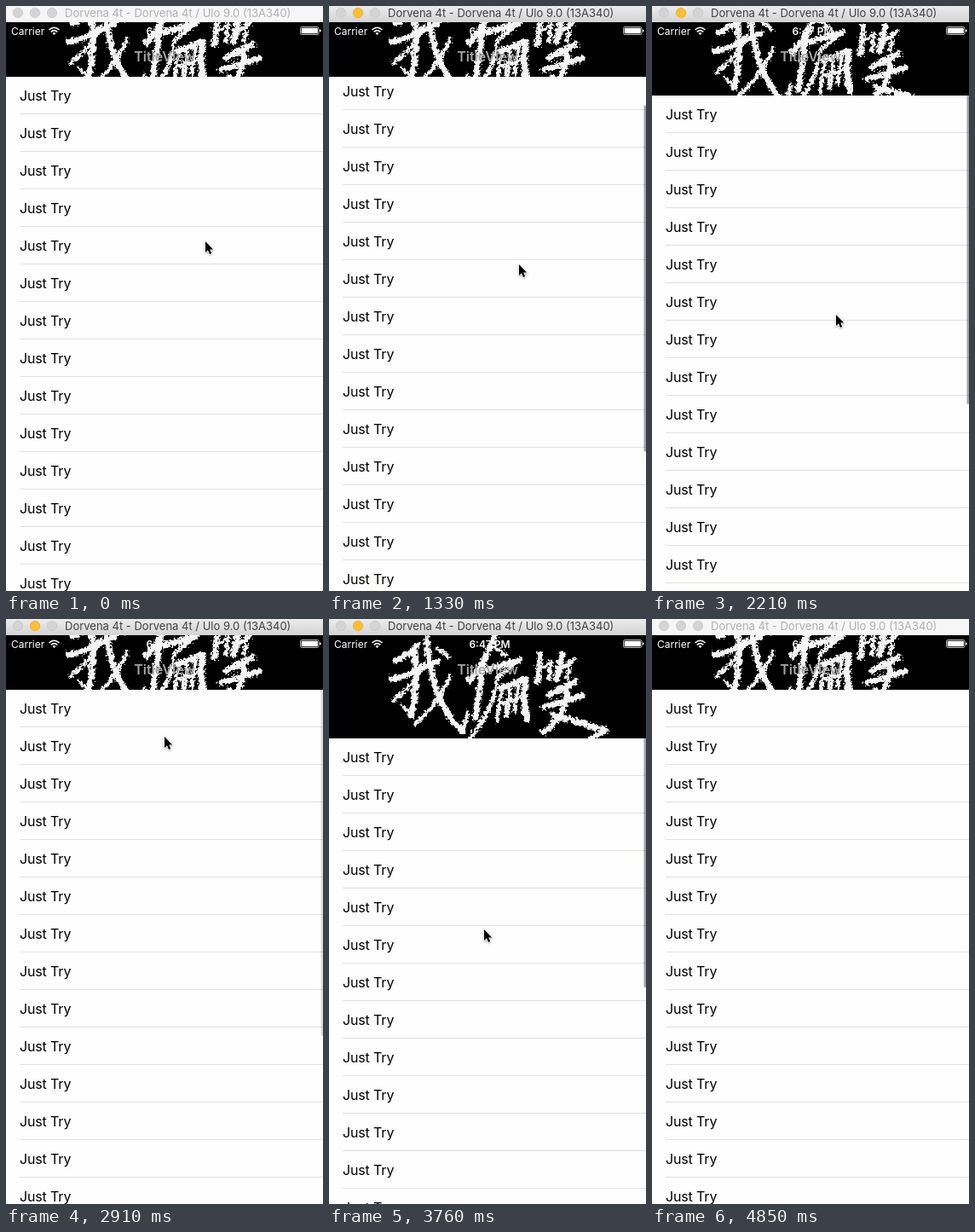
Animation of 372 by 686 pixels, one loop 4.88 s. Source, as an HTML page:

```html
<!DOCTYPE html>
<html>
<head>
<meta charset="utf-8">
<style>
  html, body { margin: 0; width: 100%; height: 100%; overflow: hidden; background: #fefefe; }
  svg { display: block; }
  text { font-family: Inter, "Open Sans", sans-serif; }
  #rows text { font-size: 16px; letter-spacing: -.15px; }
  #rows rect { fill: #e1e1e3; }
  #status { fill: #fff; font-size: 12px; }
  #ink { fill: none; stroke: #f4f4f4; stroke-linecap: round; stroke-linejoin: round; }
  .broad { stroke-width: 7; }
  .fine { stroke-width: 4.5; }
  circle { fill: #d4d4d4; stroke: #c2c2c2; stroke-width: .6; }
  #bar { fill: #f6f6f6; }
  #name { fill: #b0b0b0; font-size: 13px; }
  .active #bar { fill: url(#chrome); }
  .active #name { fill: #404040; }
  .active #amber { fill: #fdbe2f; stroke: #e0a126; }
</style>
</head>
<body>
<svg id="stage" width="372" height="686">
  <defs>
    <linearGradient id="chrome" x2="0" y2="1">
      <stop stop-color="#ececec"/><stop offset="1" stop-color="#d3d3d3"/>
    </linearGradient>
    <filter id="bristle" color-interpolation-filters="sRGB">
      <feTurbulence baseFrequency=".2" numOctaves="2" seed="4"/>
      <feDisplacementMap in="SourceGraphic" scale="7" xChannelSelector="R" yChannelSelector="G"/>
    </filter>
  </defs>
  <rect width="372" height="686" fill="#fefefe"/>
  <g id="rows"></g>
  <rect id="thumb" x="369.5" width="2.5" rx="1.2"/>
  <svg id="cover" y="19" width="372">
    <rect width="372" height="686"/>
    <g id="ink">
      <g filter="url(#bristle)">
        <path class="broad" d="M102 16Q92 29 76 34M72 56Q95 51 126 35M98 24Q104 56 95 99M113 9Q118 86 155 117"/>
        <path class="fine" d="M95 99L84 87M108 39Q97 65 73 82M155 117L161 96M140 53Q126 86 99 109M126 20L139 31"/>
        <path class="broad" d="M193 4Q185 32 163 58M179 38Q174 71 170 102M184 45L221 34M200 67L229 56Q225 87 231 103"/>
        <path class="fine" d="M221 34L196 55Q192 91 163 127M202 63L195 106M211 65L207 99M220 63L216 94M198 85L228 77M192 19L206 28"/>
        <path class="broad" d="M246 28L243 59M272 27L265 57M288 59L256 75M250 89L295 76M278 66Q279 99 250 118M260 98L323 116"/>
        <path class="fine" d="M244 47L258 36M259 36L257 56M267 46L286 33M280 40L278 56M323 117L304 125"/>
      </g>
    </g>
  </svg>
  <text x="186" y="65" text-anchor="middle" font-size="16" font-weight="600" fill="#a4a4a4">TitleView</text>
  <g id="status">
    <text x="6" y="33.5">Carrier</text>
    <text x="188.5" y="33.5" text-anchor="middle" font-weight="600">6:47 PM</text>
    <path d="M50.5 28Q56.5 22.5 62.5 28M52.7 30.3Q56.5 26.8 60.3 30.3" fill="none" stroke="#fff" stroke-width="1.6"/>
    <path d="M54.5 32Q56.5 30.2 58.5 32L56.5 34Z"/>
    <rect x="345.5" y="24.5" width="21.5" height="9" rx="1.8" fill="none" stroke="#fff" stroke-width=".7"/>
    <rect x="346.7" y="25.7" width="19.1" height="6.6" rx=".8"/>
    <rect x="368" y="27.5" width="1.5" height="3" rx=".7"/>
  </g>
  <rect id="bar" width="372" height="19"/>
  <circle cx="14" cy="8" r="5.7"/>
  <circle cx="34" cy="8" r="5.7" id="amber"/>
  <circle cx="54" cy="8" r="5.7"/>
  <text id="name" x="69" y="13">Dorvena 4t - Dorvena 4t / Ulo 9.0 (13A340)</text>
  <path id="cursor" d="M0 0V13L3 10.2L5 15L7.2 14L5.2 9.4H9.2Z"
    stroke="#fff" stroke-width="1.4" paint-order="stroke" style="filter:drop-shadow(0 1px 1px #0005)"/>
</svg>
<script>
const LOOP = 4880, ROW = 44, TOP = 83, VIEW = 603;
const REST = 59;                                // where the first scroll settles
const GRAB = 1880, DROP = 2380, REGRAB = 2980, REDROP = 3649;

const $ = id => document.getElementById(id);
const set = (el, attrs) => { for (const k in attrs) el.setAttribute(k, attrs[k]); };
const ramp = (t, a, b) => Math.min(1, Math.max(0, (t - a) / (b - a)));

const linear = u => u;
const smooth = u => u * u * (3 - 2 * u);
const easeOut = u => 1 - (1 - u) ** 2;
const sineOut = u => Math.sin(u * Math.PI / 2);

$('rows').innerHTML = Array.from({ length: 20 }, (_, i) =>
  `<text x="16" y="${TOP + i * ROW + 27.5}">Just Try</text>` +
  `<rect x="16" y="${TOP + i * ROW + 43}" width="356" height="1"/>`).join('');

// Each leg moves the pointer on to x, y
const legs = [
  { from: 60, to: 500, x: 217, y: 374, ease: linear },
  { from: 760, to: 1730, x: 227, y: 253, ease: linear },
  { from: GRAB, to: DROP, x: 211, y: 417, ease: linear },
  { from: 2440, to: 2910, x: 186, y: 138, ease: smooth },
  { from: REGRAB, to: 3500, x: 182, y: 364, ease: sineOut },
  { from: 4190, to: 4670, x: 400, y: 560, ease: smooth }
];
function pointer(t) {
  let x = 234, y = 276;
  for (const leg of legs) {
    const u = leg.ease(ramp(t, leg.from, leg.to));
    x += (leg.x - x) * u;
    y += (leg.y - y) * u;
  }
  return { x, y };
}

// Dragging past the top meets growing resistance
const rubber = off => off >= 0 ? off : -VIEW * (1 - 1 / (1 - off * .55 / VIEW));
const drag = (t, anchor, max) => rubber(Math.min(max, anchor - pointer(t).y));
// Critically damped return to rest
const spring = ms => (1 + ms / 80) * Math.exp(-ms / 80);

function offset(t) {
  if (t < GRAB) return REST * easeOut(ramp(t, 760, 1730));
  if (t < DROP) return drag(t, 320, REST);
  if (t < REGRAB) return drag(DROP, 320, REST) * spring(t - DROP);
  if (t < REDROP) return drag(t, 154, 0);
  return drag(REDROP, 154, 0) * spring(t - REDROP);
}

function draw(t) {
  const off = Math.round(offset(t)), { x, y } = pointer(t);
  const pull = Math.max(0, -off), h = TOP - 19 + pull;
  set($('rows'), { transform: `translate(0 ${-off})` });
  set($('cover'), { height: h });
  set($('ink'), {
    transform: `translate(186 ${h / 2}) scale(${Math.max(1, h / 160)}) translate(-186 -67)`
  });
  set($('thumb'), {
    y: TOP + pull + Math.max(0, off) * VIEW / (20 * ROW),
    height: 406 - 2 * pull,
    opacity: .36 * (ramp(t, 700, 800) - ramp(t, 2800, 2980) + ramp(t, 3000, 3060) - ramp(t, 4250, 4500))
  });
  set($('cursor'), { transform: `translate(${Math.round(x)} ${Math.round(y)})` });
  $('stage').classList.toggle('active', t >= 670 && t < 4850);
}

const start = performance.now();
function tick() {
  draw((performance.now() - start) % LOOP);
  requestAnimationFrame(tick);
}
tick();
</script>
</body>
</html>
```
